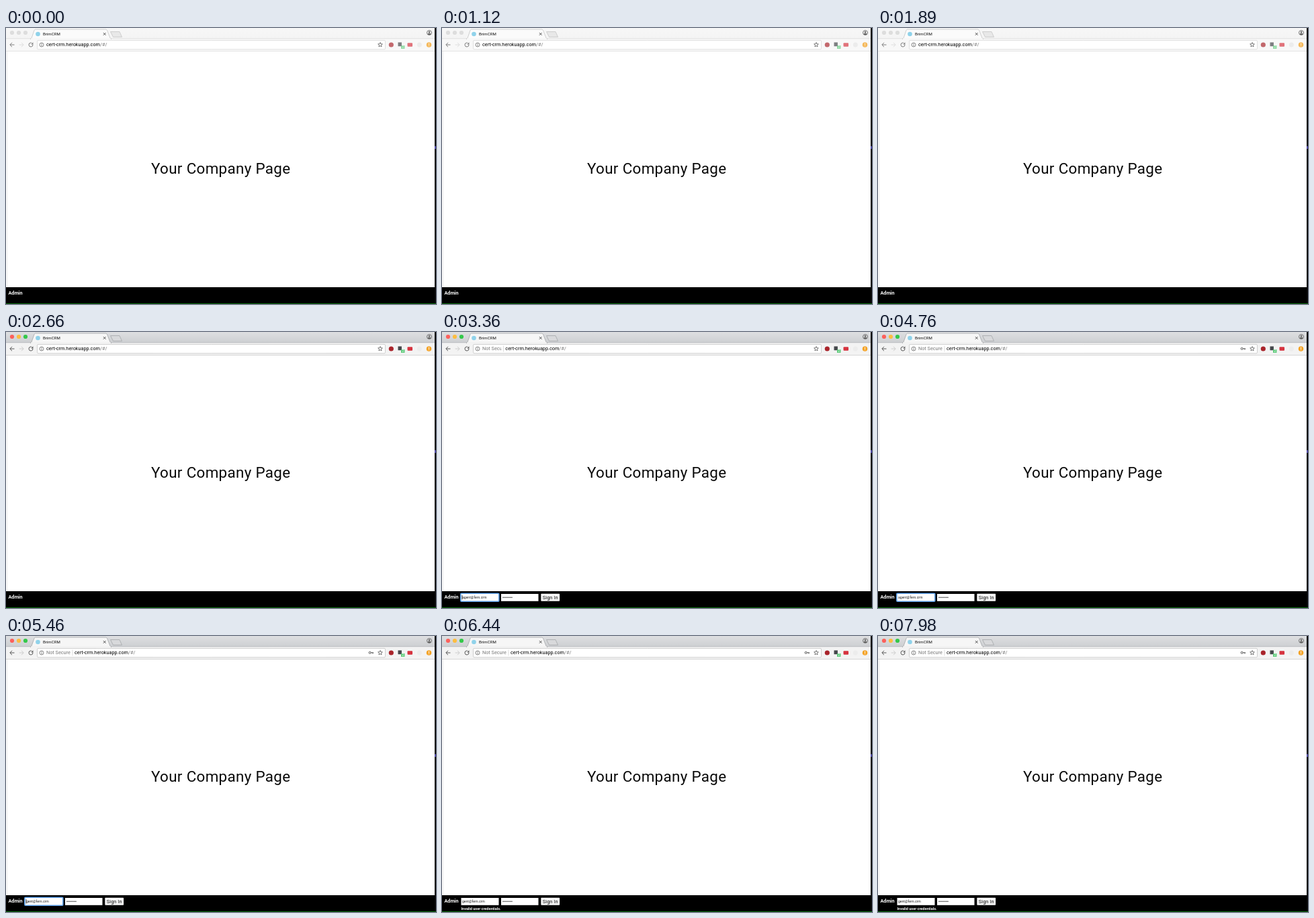
An HTML page with a canvas for the animation above (8 s loop, 640 by 411 pixels).

```html
<!DOCTYPE html>
<html lang="en">
<head>
<meta charset="utf-8">
<title>Company page</title>
<style>
  html, body { margin: 0; width: 100%; height: 100%; overflow: hidden; background: #fff; }
  canvas { display: block; width: 640px; height: 411px; }
</style>
</head>
<body>
<canvas id="stage"></canvas>
<script>
const W = 640, H = 411, LOOP = 8000;
const FOCUS_IN = 1890, FOCUS_DONE = 2170;
const FORM_OPEN = 3080, CHIP_DONE = 3570;
const KEY_SHOWN = 4200, LETTER_CUT = 5280, REJECTED = 6230;
const FONT = 'Roboto, Arial, sans-serif';

const canvas = document.getElementById('stage');
const ctx = canvas.getContext('2d');
const dpr = window.devicePixelRatio || 1;
canvas.width = W * dpr;
canvas.height = H * dpr;

const clamp = v => Math.max(0, Math.min(1, v));
const progress = (t, a, b) => clamp((t - a) / (b - a));
const easeOut = p => 1 - (1 - p) * (1 - p);
const lerp = (a, b, p) => a + (b - a) * p;

function mix(a, b, p) {
  return `rgb(${a.map((v, i) => Math.round(lerp(v, b[i], p))).join(',')})`;
}

function rect(x, y, w, h, color) {
  ctx.fillStyle = color;
  ctx.fillRect(x, y, w, h);
}

function box(x, y, w, h, r, fill, stroke, width = 0.7) {
  ctx.beginPath();
  ctx.roundRect(x, y, w, h, r);
  if (fill) { ctx.fillStyle = fill; ctx.fill(); }
  if (stroke) { ctx.strokeStyle = stroke; ctx.lineWidth = width; ctx.stroke(); }
}

function disc(x, y, r, fill, stroke, width = 0.8) {
  ctx.beginPath();
  ctx.arc(x, y, r, 0, 7);
  if (fill) { ctx.fillStyle = fill; ctx.fill(); }
  if (stroke) { ctx.strokeStyle = stroke; ctx.lineWidth = width; ctx.stroke(); }
}

function path(points, stroke, width = 1, fill) {
  ctx.beginPath();
  points.forEach(([x, y], i) => i ? ctx.lineTo(x, y) : ctx.moveTo(x, y));
  if (fill) { ctx.closePath(); ctx.fillStyle = fill; ctx.fill(); }
  if (stroke) { ctx.strokeStyle = stroke; ctx.lineWidth = width; ctx.stroke(); }
}

function text(str, x, y, size, color, weight = 400, align = 'left') {
  ctx.font = `${weight} ${size}px ${FONT}`;
  ctx.textAlign = align;
  ctx.fillStyle = color;
  ctx.fillText(str, x, y);
  return ctx.measureText(str).width;
}

function arrow(x, dir, color) {
  path([[x - 3 * dir, 25], [x + 3.5 * dir, 25]], color, 1);
  path([[x, 21.8], [x - 3.2 * dir, 25], [x, 28.2]], color, 1);
}

function star(x, y, color) {
  const points = [];
  for (let i = 0; i <= 10; i++) {
    const r = i % 2 ? 1.6 : 3.5, a = i * Math.PI / 5 - Math.PI / 2;
    points.push([x + r * Math.cos(a), y + r * Math.sin(a)]);
  }
  path(points, color, 0.8);
}

function drawTabs(k) {
  const strip = ctx.createLinearGradient(0, 0, 0, 16);
  strip.addColorStop(0, mix([247, 247, 247], [222, 223, 225], k));
  strip.addColorStop(1, mix([244, 244, 244], [205, 207, 210], k));
  rect(0, 0, W, 16, strip);
  rect(0, 15.5, W, 0.7, mix([215, 215, 215], [178, 180, 183], k));

  const idle = [221, 221, 221];
  const lights = [[252, 97, 92], [253, 189, 64], [52, 200, 74]];
  lights.forEach((c, i) => disc(9 + i * 10, 7, 3.1, mix(idle, c, k)));

  const edge = mix([198, 198, 198], [165, 167, 170], k);
  path([[36, 16.4], [38, 15], [42, 3.4], [43.5, 2], [149, 2], [150.5, 3.4],
    [155, 15], [157, 16.4]], edge, 0.8, mix([251, 251, 251], [246, 246, 246], k));
  rect(37, 15.4, 119, 2, mix([248, 248, 248], [243, 243, 243], k));
  path([[155.5, 5.5], [169, 5.5], [172.5, 13.4], [159.5, 13.4], [155.5, 5.5]], edge, 0.8,
    mix([232, 232, 232], [216, 217, 219], k));

  disc(47.5, 9, 3.3, '#8fd2ea');
  text('BrimCRM', 55, 11.2, 6.1, '#111');
  path([[144.8, 7], [148.6, 10.8]], '#444', 0.9);
  path([[148.6, 7], [144.8, 10.8]], '#444', 0.9);

  disc(630, 7, 3.5, null, '#666', 0.9);
  disc(630, 6, 1.3, '#666');
  ctx.beginPath();
  ctx.arc(630, 10, 2.4, Math.PI, 0);
  ctx.fillStyle = '#666';
  ctx.fill();
}

function drawAddress(t) {
  const slide = easeOut(progress(t, FORM_OPEN, CHIP_DONE));
  const x = lerp(60, 102, slide);

  disc(53, 25, 3, null, '#666', 0.8);
  rect(52.6, 24.5, 0.9, 2.3, '#666');
  rect(52.6, 23, 0.9, 0.9, '#666');

  if (slide > 0) {
    ctx.save();
    ctx.beginPath();
    ctx.rect(59, 18, Math.max(0, x - 65), 14);
    ctx.clip();
    text('Not Secure', 60, 27.4, 7.3, '#777');
    ctx.restore();
    rect(x - 3.4, 20.5, 0.7, 9, '#ccc');
  }
  const host = text('cert-crm.herokuapp.com', x, 27.4, 7.3, '#000');
  text('/#/', x + host, 27.4, 7.3, '#777');

  if (t >= KEY_SHOWN) {
    disc(541.6, 24.8, 1.5, null, '#555', 1);
    path([[543, 24.8], [547, 24.8]], '#555', 1);
    path([[546, 24.8], [546, 26.5]], '#555', 1);
  }
  star(557, 25, '#555');
}

function drawToolbar(t, k) {
  rect(0, 16, W, 18, mix([248, 248, 248], [243, 243, 243], k));
  rect(0, 34, W, 1, mix([228, 228, 228], [214, 214, 214], k));
  arrow(9, 1, mix([125, 125, 125], [85, 85, 85], k));
  arrow(23, -1, mix([222, 222, 222], [205, 205, 205], k));

  const grey = mix([125, 125, 125], [85, 85, 85], k);
  ctx.beginPath();
  ctx.arc(37, 25, 3, -0.1, 5.2);
  ctx.strokeStyle = grey;
  ctx.lineWidth = 1;
  ctx.stroke();
  path([[40.4, 21.3], [40.4, 24.4], [37.4, 24.4]], null, 0, grey);

  box(46.5, 18.4, 518, 13.4, 1.5, '#fff', mix([212, 212, 212], [190, 190, 190], k));
  drawAddress(t);

  ctx.globalAlpha = lerp(0.68, 1, k);
  disc(573.3, 25, 3.6, '#a9242b');
  rect(583.5, 21.4, 5.4, 5.8, '#44474b');
  box(588, 26, 5.4, 5, 0.6, '#5fcb7c');
  text('2', 590.7, 30.3, 4.6, '#fff', 400, 'center');
  box(597.5, 22.2, 7.5, 5.6, 1, '#d6333f');
  ctx.globalAlpha = 1;
  disc(615.3, 25, 3.5, '#ececec');
  ctx.globalAlpha = lerp(0.75, 1, k);
  disc(629.5, 25, 3.8, '#f4a52b');
  rect(629.1, 22.7, 0.9, 2.8, '#fff');
  rect(629.1, 26.3, 0.9, 0.9, '#fff');
  ctx.globalAlpha = 1;
}

function caretOn(t) {
  if (t >= REJECTED) return false;
  if (t >= LETTER_CUT) return t < 5810;
  return Math.floor((t - FORM_OPEN) / 530) % 2 === 0;
}

function drawForm(t) {
  const focused = t < REJECTED;
  if (focused) box(27.8, 389.2, 57, 12, 1.2, '#fff', '#5b9ee6', 1.6);
  else rect(28.5, 390, 56, 10.8, '#fff');
  rect(88, 390, 55.5, 10.8, '#fff');
  box(147.3, 389.8, 27.8, 11, 0.8, '#f7f7f7');

  text(t < LETTER_CUT ? 'agent@fern.crm' : 'gent@fern.crm', 30, 397, 5.1, '#222');
  if (caretOn(t)) rect(29.6, 392, 0.8, 6.4, '#111');
  for (let i = 0; i < 7; i++) disc(91 + i * 2.15, 395.2, 0.8, '#222');
  text('Sign In', 161.2, 397.6, 7.5, '#111', 400, 'center');
  if (!focused) text('Invalid user credentials.', 28.5, 407.6, 5.5, '#fff', 700);
}

function drawPage(t) {
  rect(0, 35, W, 351, '#fff');
  rect(0, 35, 3, 351, '#f7f7f7');
  ctx.letterSpacing = '0.33px';
  text('Your Company Page', 216, 217, 22.4, '#0a0a0a');
  ctx.letterSpacing = '0px';
  rect(0, 386, W, 25, '#000');
  text('Admin', 3.5, 397.3, 7.2, '#fff', 700);
  if (t >= FORM_OPEN) drawForm(t);
  rect(0, 410, W, 1, '#0a6a10');
}

function draw(t) {
  const k = progress(t, FOCUS_IN, FOCUS_DONE);
  ctx.setTransform(dpr, 0, 0, dpr, 0, 0);
  drawPage(t);
  drawToolbar(t, k);
  drawTabs(k);
  rect(638, 0, 2, 410, '#08080a');
  rect(638, 176, 2, 4, '#4a44a0');
}

const start = performance.now();
function frame() {
  draw((performance.now() - start) % LOOP);
  requestAnimationFrame(frame);
}
frame();
</script>
</body>
</html>
```
